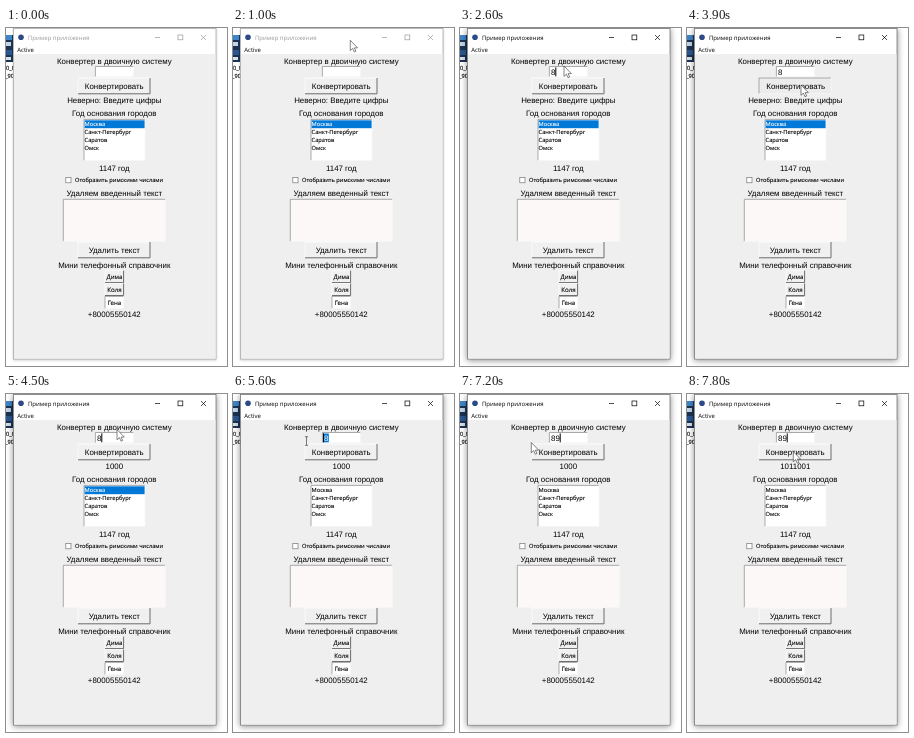
Write an HTML page that moves like this. It is 221x338 px and loops after 8 s.

```html
<!DOCTYPE html>
<html lang="ru">
<head>
<meta charset="utf-8">
<title>Пример приложения</title>
<style>
html, body { margin: 0; width: 100%; height: 100%; overflow: hidden; background: #fff; }
svg { display: block; width: 221px; height: 338px; }
text { text-rendering: geometricPrecision; white-space: pre; fill: #000; }
.label { font: 7.9px "Liberation Sans", Arial, sans-serif; }
.mid { text-anchor: middle; }
.small { font: 5.7px "Open Sans", "Noto Sans", sans-serif; stroke: currentColor; stroke-width: .12px; }
.bar { font-size: 6px; stroke: none; }
.person { font-size: 6.1px; }
#edge { filter: drop-shadow(0 1px 1px #0003); }
#edge.active { filter: drop-shadow(0 1.5px 3px #0007); }
</style>
</head>
<body>
<svg id="stage" viewBox="0 0 221 338"></svg>
<script>
const LOOP = 8000, STEP = 100;
const stage = document.getElementById('stage');
const $ = id => document.getElementById(id);

const rect = (x, y, w, h, fill, extra = '') =>
  `<rect x="${x}" y="${y}" width="${w}" height="${h}" fill="${fill}" ${extra}/>`;
const line = (d, color, width = 0.7) =>
  `<path d="${d}" fill="none" stroke="${color}" stroke-width="${width}"/>`;
const label = (y, s, id = '') =>
  `<text class="label mid" x="108.3" y="${y}" id="${id}">${s}</text>`;
const small = (x, y, s, cls = '', id = '') =>
  `<text class="small ${cls}" x="${x}" y="${y}" id="${id}">${s}</text>`;

// Classic 3D frame: light and dark edges swap when sunken
function bevel(x, y, w, h, fill, sunken) {
  const [a, b] = sunken ? ['#8a8a8a', '#f8f8f8'] : ['#fff', '#6c6c6c'];
  return rect(x, y, w, h, fill) +
    line(`M${x} ${y + h}V${y}H${x + w}`, a) +
    line(`M${x} ${y + h}H${x + w}V${y}`, b, sunken ? 0.7 : 1);
}

const desktop =
  rect(0, 7, 7, 27, '#1d3354') + rect(0, 7, 6, 5, '#3f86c8') +
  rect(0, 14, 5, 4, '#c4d5e6') + rect(0, 22, 6, 5, '#2a5790') + rect(0, 29, 5, 3, '#d8e0e8') +
  small(0, 42, '0_0') + small(-1, 50, '_90');

const frame =
  rect(7.5, 0.5, 202.5, 330.5, '#fff', 'id="edge" stroke-width=".8"') +
  rect(8, 26, 201.5, 304.6, '#efefef') +
  '<circle cx="15" cy="9.3" r="2.8" fill="#2b4a86"/>' +
  small(22, 11.5, 'Пример приложения', 'bar', 'title') +
  '<g id="buttons" fill="none" stroke-width=".7"><path d="M149 9.5h5M195 7l5 5m0-5l-5 5"/><rect x="172" y="7" width="4.8" height="4.8"/></g>' +
  small(11.3, 23.8, 'Active', 'bar');

const cities = ['Москва', 'Санкт-Петербург', 'Саратов', 'Омск'];
const people = ['Дима', 'Коля', 'Гена'];

const form =
  label(36, 'Конвертер в двоичную систему') +
  bevel(89.4, 38.5, 38, 10.2, '#fff', true) +
  rect(90.2, 39.5, 5.6, 8.8, '#0078d7', 'id="mark"') +
  '<text class="label" x="91" y="46.8" id="entry"></text>' +
  rect(90, 39.4, 1, 8.9, '#000', 'id="caret"') +
  `<g id="up">${bevel(72, 50, 72, 15.8, '#f0f0f0')}</g>` +
  `<g id="down">${bevel(72, 50, 72, 15.8, '#ececec', true)}</g>` +
  label(60.7, 'Конвертировать', 'convert') +
  label(75.2, '', 'result') +
  label(87.7, 'Год основания городов') +
  bevel(78, 91.4, 61, 41, '#fff', true) +
  rect(78.6, 92.3, 60, 7.9, '#0078d7', 'id="pick"') +
  cities.map((c, i) => small(78.6, 98.3 + 8 * i, c, '', 'city' + i)).join('') +
  label(142.6, '1147 год') +
  rect(59.8, 149.6, 5.2, 5.2, '#fff', 'stroke="#777" stroke-width=".7"') +
  small(69, 154.4, 'Отобразить римскими числами') +
  label(168, 'Удаляем введенный текст') +
  bevel(57.3, 171.3, 102, 42, '#fcf8f8', true) +
  bevel(72, 214, 72, 15.8, '#f0f0f0') +
  label(224.7, 'Удалить текст') +
  label(239.5, 'Мини телефонный справочник') +
  people.map((p, i) => bevel(99, 242.6 + 12.9 * i, 18.6, 12, i == 2 ? '#fff' : '#f0f0f0', i == 2) +
    small(108.5, 250.8 + 12.9 * i, p, 'mid person')).join('') +
  label(289, '+80005550142');

const pointers =
  '<path id="arrow" d="M0 0V10.3L2.4 8.1 4 11.7 5.6 11 4.1 7.6H7.3Z" fill="#fff" stroke="#333" stroke-width=".6"/>' +
  '<path id="beam" d="M-1.6 -4.3H1.6M0 -4.3V4.3M-1.6 4.3H1.6" fill="none" stroke="#444" stroke-width=".7"/>';

stage.innerHTML = desktop + frame + form + pointers;

// time, x, y of the pointer
const path = [
  [0, 130, -16], [600, 130, -16], [1400, 104.5, 40.5], [1500, 104.5, 40.5], [1700, 104, 38],
  [3100, 104, 38], [3300, 114, 57], [4100, 114, 57], [4500, 111, 35.5], [4700, 111, 35.5],
  [5100, 97, 44], [5300, 97, 44], [5600, 73.5, 47], [5800, 71.3, 48.5], [7200, 71.3, 48.5],
  [7400, 113, 62], [7500, 106.3, 57.5], [LOOP, 106.3, 57.5]
];

function pointerAt(t) {
  const i = path.findIndex(p => p[0] > t);
  const [t0, x0, y0] = path[i - 1], [t1, x1, y1] = path[i];
  const k = (t - t0) / (t1 - t0), e = k * k * (3 - 2 * k);
  return [x0 + (x1 - x0) * e, y0 + (y1 - y0) * e];
}

const within = (t, a, b) => t >= a && t < b;
const show = (id, on) => $(id).setAttribute('visibility', on ? 'visible' : 'hidden');

function paint(id, color) {
  $(id).style.fill = $(id).style.color = color;
}

function draw(t) {
  const active = t >= 1500;
  const selected = within(t, 5500, 6000);
  const pressed = within(t, 3900, 4000) || within(t, 7700, 7800);
  const value = t < 2600 ? '' : t < 6500 ? '8' : '89';

  paint('title', active ? '#000' : '#999');
  $('buttons').setAttribute('stroke', active ? '#000' : '#999');
  $('edge').setAttribute('stroke', active ? '#777' : '#aaa');
  $('edge').classList.toggle('active', active);

  $('entry').textContent = value;
  paint('entry', selected ? '#fff' : '#000');
  show('mark', selected);
  $('caret').setAttribute('x', value && !selected ? 90.9 + 4.4 * value.length : 90);
  show('caret', active && (t - 1500) % 900 < 600);

  show('up', !pressed);
  show('down', pressed);
  $('convert').setAttribute('transform', pressed ? 'translate(.5 .5)' : '');
  $('result').textContent =
    t < 4000 ? 'Неверно: Введите цифры' : (t < 7800 ? 8 : 89).toString(2);

  show('pick', t < 5500);
  paint('city0', t < 5500 ? '#fff' : '#000');

  const [x, y] = pointerAt(t);
  const beam = within(t, 1400, 1600) || within(t, 5000, 5700);
  show('beam', beam);
  show('arrow', !beam);
  $(beam ? 'beam' : 'arrow').setAttribute('transform', `translate(${x} ${y})`);
}

const start = performance.now();
function tick() {
  const t = (performance.now() - start) % LOOP;
  draw(Math.floor(t / STEP) * STEP);
  requestAnimationFrame(tick);
}
tick();
</script>
</body>
</html>
```
